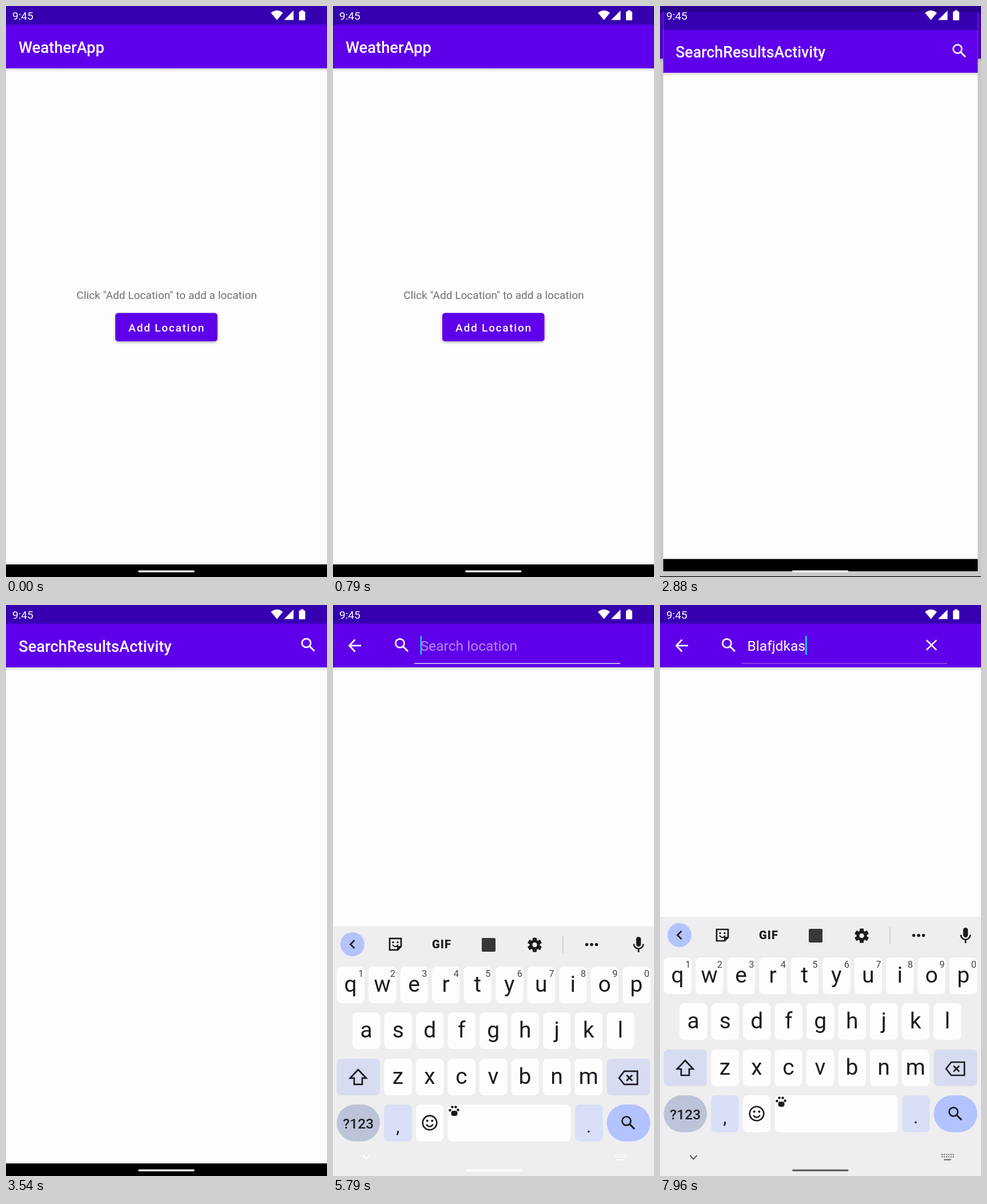
Recreate the animation shown at these times as an HTML page with a canvas. Size 561 by 998 pixels, loop 8 s.

```html
<!DOCTYPE html>
<html lang="en">
<head>
<meta charset="utf-8">
<title>WeatherApp</title>
<style>
  html, body { margin: 0; width: 100%; height: 100%; overflow: hidden; background: #000; }
  canvas { display: block; width: 561px; height: 998px; }
</style>
</head>
<body>
<canvas id="stage" width="561" height="998"></canvas>
<script>
const W = 561, H = 998, LOOP = 8000;
const ctx = document.getElementById('stage').getContext('2d');

const INK = '#1c1b1f', PAPER = '#fdfdfd', PURPLE = '#5f00ea', DARK_PURPLE = '#3600b1';
const TIME = { press: 2460, open: 2750, search: 4790, focus: 5560, keyboard: 5590, navTint: 5810 };
const TYPED = 'Blafjdkas';
const KEY_TIMES = [6500, 6690, 6840, 7110, 7250, 7400, 7540, 7680, 7810];
const KEYBOARD_TOP = 545;

const clamp = v => Math.min(1, Math.max(0, v));
const progress = (t, start, length) => clamp((t - start) / length);

// Height of a cubic curve at x, found by bisection.
function curve(x, x0, y0, x1, y1, x2, y2, x3, y3) {
  const at = (s, a, b, c, d) =>
    a * (1 - s) ** 3 + 3 * b * s * (1 - s) ** 2 + 3 * c * s * s * (1 - s) + d * s ** 3;
  let lo = 0, hi = 1;
  for (let i = 0; i < 24; i++) {
    const mid = (lo + hi) / 2;
    if (at(mid, x0, x1, x2, x3) < x) lo = mid; else hi = mid;
  }
  return at(lo, y0, y1, y2, y3);
}
const easeWindow = x => x < 1 / 6
  ? curve(x, 0, 0, 0.05, 0, 0.1333, 0.06, 1 / 6, 0.4)
  : curve(x, 1 / 6, 0.4, 0.2083, 0.82, 0.25, 1, 1, 1);
const easeKeyboard = x => curve(x, 0, 0, 0.2, 0, 0, 1, 1, 1);

function box(x, y, w, h, color, r = 0) {
  ctx.fillStyle = color;
  ctx.beginPath();
  ctx.roundRect(x, y, w, h, r);
  ctx.fill();
}

function disc(x, y, r, color) {
  ctx.fillStyle = color;
  ctx.beginPath();
  ctx.arc(x, y, r, 0, Math.PI * 2);
  ctx.fill();
}

function arc(x, y, r, color, width, from = 0, to = Math.PI * 2) {
  ctx.strokeStyle = color;
  ctx.lineWidth = width;
  ctx.beginPath();
  ctx.arc(x, y, r, from, to);
  ctx.stroke();
}

function line(points, color, width, closed = false) {
  ctx.strokeStyle = color;
  ctx.lineWidth = width;
  ctx.beginPath();
  points.forEach(([x, y]) => ctx.lineTo(x, y));
  if (closed) ctx.closePath();
  ctx.stroke();
}

function polygon(points, color) {
  ctx.fillStyle = color;
  ctx.beginPath();
  points.forEach(([x, y]) => ctx.lineTo(x, y));
  ctx.fill();
}

function label(text, x, y, size, color, weight = 400, align = 'left', spacing = 0) {
  ctx.font = `${weight} ${size}px Roboto, sans-serif`;
  ctx.textAlign = align;
  ctx.letterSpacing = spacing + 'px';
  ctx.fillStyle = color;
  ctx.fillText(text, x, y);
  const width = ctx.measureText(text).width;
  ctx.letterSpacing = '0px';
  return width;
}

function magnifier(x, y, color) {
  arc(x - 3.1, y - 3.1, 7.6, color, 2.7);
  line([[x + 2.2, y + 2.2], [x + 11, y + 11]], color, 3);
}

function cross(x, y, r, color, width) {
  line([[x - r, y - r], [x + r, y + r]], color, width);
  line([[x - r, y + r], [x + r, y - r]], color, width);
}

function windowFrame() {
  box(0, 0, W, H, PAPER);
  const shade = ctx.createLinearGradient(0, 109, 0, 115);
  shade.addColorStop(0, 'rgba(0,0,0,.14)');
  shade.addColorStop(1, 'rgba(0,0,0,0)');
  box(0, 109, W, 6, shade);
  box(0, 32, W, 77, PURPLE);
  box(0, 0, W, 32.5, DARK_PURPLE);
  box(0, 976, W, 22, '#000');
}

function homeScreen(t) {
  windowFrame();
  label('WeatherApp', 22, 82, 27.3, '#fff', 500);
  label('Click "Add Location" to add a location', 281, 512, 19.1, '#707070', 400, 'center');
  ctx.save();
  ctx.shadowColor = 'rgba(0,0,0,.3)';
  ctx.shadowBlur = 4;
  ctx.shadowOffsetY = 2;
  box(191, 536.5, 178.5, 49.5, PURPLE, 5);
  ctx.restore();
  if (t > TIME.press) {
    const alpha = 0.24 * progress(t, TIME.press, 75) * (1 - progress(t, TIME.press + 225, 200));
    ctx.save();
    ctx.beginPath();
    ctx.roundRect(191, 536.5, 178.5, 49.5, 5);
    ctx.clip();
    disc(280, 561, 30 + 65 * progress(t, TIME.press, 225), `rgba(255,255,255,${alpha})`);
    ctx.restore();
  }
  label('Add Location', 214, 569, 19.1, '#fff', 500, 'left', 1.71);
}

function searchField(t) {
  const count = KEY_TIMES.filter(k => t >= k).length;
  line([[28, 71], [49, 71]], '#fff', 2.8);
  line([[38.5, 60.5], [28.5, 71], [38.5, 81.5]], '#fff', 2.8);
  magnifier(120, 70, '#fff');
  box(142, 101.5, 360, 1.4, `rgba(255,255,255,${count ? 0.32 : 0.85})`);

  let textWidth = 0;
  if (count) {
    textWidth = label(TYPED.slice(0, count), 152.5, 80, 24.6, '#fff');
    cross(474.5, 70, 8.7, '#fff', 2.6);
  } else {
    label('Search location', 152.5, 80, 24.6, 'rgba(255,255,255,.53)');
  }
  const blinkStart = count ? KEY_TIMES[count - 1] : TIME.focus;
  if (t >= TIME.focus && (t - blinkStart) % 1000 < 500) {
    box(152.5 + textWidth, 54, 2.7, 33, '#10d2e0');
  }
}

function searchScreen(t) {
  windowFrame();
  if (t >= TIME.search) {
    searchField(t);
  } else {
    label('SearchResultsActivity', 22, 82, 27.3, '#fff', 500);
    magnifier(528, 69.5, '#fff');
  }
}

function scaled(scale, draw) {
  ctx.save();
  ctx.translate(W / 2, H / 2);
  ctx.scale(scale, scale);
  ctx.translate(-W / 2, -H / 2);
  draw();
  ctx.restore();
}

function statusIcons() {
  label('9:45', 11, 24, 19.1, '#fff');
  ctx.fillStyle = '#fff';
  ctx.beginPath();
  ctx.moveTo(473.5, 24.5);
  ctx.lineTo(463, 12);
  ctx.quadraticCurveTo(473.5, 3.5, 484, 12);
  ctx.fill();
  polygon([[486, 24.5], [502.5, 24.5], [502.5, 8]], '#fff');
  box(512, 9.5, 11, 15.5, '#fff', 1.5);
  box(515, 7.5, 5, 3, '#fff');
}

function toolbar() {
  disc(34, 577, 21, '#b3c3fe');
  line([[37.5, 570], [30.5, 577], [37.5, 584]], INK, 2.7);

  line([[99, 567], [119, 567], [119, 581], [113, 587], [99, 587]], INK, 2.7, true);
  polygon([[112, 588], [112, 580], [120, 580]], INK);
  disc(105, 573.5, 1.7, INK);
  disc(113, 573.5, 1.7, INK);
  arc(109, 576, 5, INK, 2.2, 0.3, 2.8);

  label('GIF', 173, 584, 20, INK, 900, 'left', 1.2);
  box(260, 566, 24, 24, '#37363a', 2);

  for (let i = 0; i < 6; i++) {
    ctx.save();
    ctx.translate(352.5, 578);
    ctx.rotate(i * Math.PI / 3);
    box(-3.5, -12.5, 7, 8, INK, 1);
    ctx.restore();
  }
  arc(352.5, 578, 6.6, INK, 5);

  box(401, 563, 1.5, 29, '#c6c6d0');
  [443.5, 452, 460.5].forEach(x => disc(x, 577.5, 2.8, INK));

  box(529.8, 564, 8.4, 17, INK, 4.2);
  arc(534, 576.5, 8.3, INK, 2.6, 0, Math.PI);
  line([[534, 585], [534, 591]], INK, 2.8);
}

function keyRow(letters, x, y, hints = '') {
  [...letters].forEach((letter, i) => {
    const left = x + i * 55.5;
    box(left, y, 48.5, 64, PAPER, 8);
    label(letter, left + 24.2, y + 44, 39, INK, 400, 'center');
    if (hints) label(hints[i], left + 42.5, y + 18, 16.5, '#45454a', 400, 'center');
  });
}

function paw(x, y) {
  [[-7, -1], [-3, -6.5], [3, -6.5], [7, -1.5]].forEach(([dx, dy]) => disc(x + dx, y + dy, 2.3, INK));
  box(x - 5, y, 11, 9, INK, 4);
}

function keyboard() {
  box(0, KEYBOARD_TOP, W, H, '#eeedef');
  toolbar();
  keyRow('qwertyuiop', 6.5, 616, '1234567890');
  keyRow('asdfghjkl', 34, 696);
  keyRow('zxcvbnm', 89.3, 777);

  box(6.5, 777, 75.5, 64, '#d7dcf1', 8);
  line([[44, 796], [58, 811], [51, 811], [51, 822], [37, 822], [37, 811], [30, 811]], INK, 2.7, true);
  box(478.5, 777, 76, 64, '#d7dcf1', 8);
  line([[509, 799], [532, 799], [532, 822], [509, 822], [500, 810.5]], INK, 2.7, true);
  cross(518, 810.5, 5, INK, 2.7);

  box(6.5, 857, 75.5, 64.5, '#bdc3d8', 32);
  label('?123', 44.2, 899, 24.5, INK, 500, 'center');
  box(89.3, 857, 48.5, 64.5, '#d8dff6', 8);
  label(',', 113.5, 906, 32, INK, 400, 'center');
  box(145, 857, 48, 64.5, PAPER, 8);
  arc(169, 889, 12.3, INK, 2.6);
  disc(164.7, 885.5, 2, INK);
  disc(173.3, 885.5, 2, INK);
  arc(169, 889.5, 6, INK, 2.4, 0.35, Math.PI - 0.35);
  box(200.5, 857, 215, 64.5, PAPER, 8);
  paw(211.5, 868);
  box(423, 857, 48.5, 64.5, '#d8dff6', 8);
  label('.', 447, 906, 32, INK, 400, 'center');
  box(478.5, 857, 76, 64.5, '#b3c3ff', 32);
  magnifier(516, 889, INK);
}

function navBar(t) {
  const tint = progress(t, TIME.navTint, 180);
  const gray = Math.round(255 - 160 * tint);
  const color = `rgb(${gray},${gray},${gray + Math.round(5 * tint)})`;
  if (t >= TIME.keyboard + 100) {
    line([[52.5, 962], [58.5, 968.5], [64.5, 962]], color, 2);
    for (let row = 0; row < 2; row++)
      for (let i = 0; i < 6; i++) box(492 + i * 3.9, 959.5 + row * 4, 2, 2, color);
    box(496, 968.5, 13, 2, color);
  }
  box(231, 986.5, 98.5, 3.2, color, 1.6);
}

function draw(t) {
  ctx.clearRect(0, 0, W, H);
  const opening = t - TIME.open;
  const open = easeWindow(progress(t, TIME.open, 400));
  if (opening < 400) {
    scaled(1 + 0.05 * open, () => homeScreen(t));
    if (open > 0) box(0, 0, W, H, `rgba(0,0,0,${0.24 * open})`);
  }
  if (opening > 0) {
    ctx.globalAlpha = progress(opening, 35, 50);
    scaled(0.85 + 0.15 * open, () => searchScreen(t));
    ctx.globalAlpha = 1;
  }
  if (t > TIME.keyboard) {
    const shown = easeKeyboard(progress(t, TIME.keyboard, 285));
    ctx.save();
    ctx.translate(0, (H - KEYBOARD_TOP) * (1 - shown));
    keyboard();
    ctx.restore();
  }
  statusIcons();
  navBar(t);
}

const start = performance.now();
function tick() {
  draw((performance.now() - start) % LOOP);
  requestAnimationFrame(tick);
}
tick();
</script>
</body>
</html>
```
